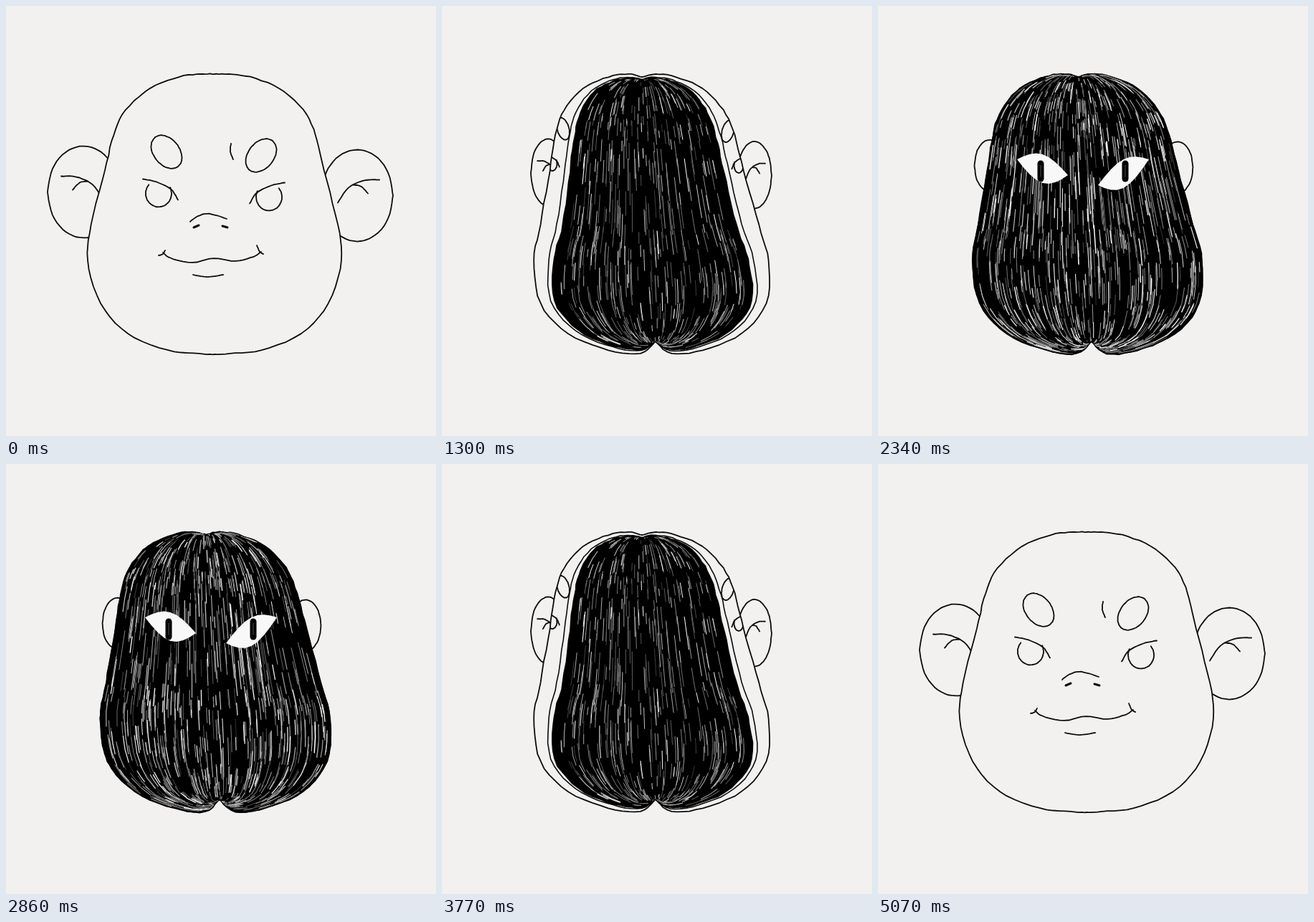
Animation, 600 px wide and 600 px high, one loop 5200 ms. Source, as an HTML page with a canvas:

```html
<!DOCTYPE html>
<html>
<head>
<meta charset="utf-8">
<style>
html, body { margin: 0; height: 100%; overflow: hidden; background: #f2f1f0; }
canvas { display: block; width: 100vw; height: 100vh; }
</style>
</head>
<body>
<canvas id="stage" width="600" height="600"></canvas>
<script>
const ctx = document.getElementById('stage').getContext('2d');
const PAPER = '#f2f1f0', INK = '#0c0c0c';
const STEP = 130, STEPS = 40;
const SIDES = [-1, 1];

const points = s => s.split(' ').map(p => p.split(',').map(Number));
const lerp = (a, b, t) => a + (b - a) * t;
const blend = (a, b, t) => a.map((v, i) => lerp(v, b[i], t));
const mix = (a, b, t) => a.map((p, i) => blend(p, b[i], t));
const clamp = (v, lo = 0, hi = 1) => Math.min(hi, Math.max(lo, v));
const smooth = v => (v = clamp(v), v * v * (3 - 2 * v));

// Half width and height of the head, from the top parting to the bottom one.
const PROFILE = points('0,95 20,95 50,99 90,115 124,145 141,180 153,230 172,305 177,355 159,415 121,457 66,480 22,485 0,486');
const LAST = PROFILE.length - 1;

// Shapes of the profile: waist scale, end scale, lean, cleft, inset.
const FACE = [1, 1, 0, 0, 0];
const SHELL = [.885, 1, 1, 1, 0];
const MANE = [.87, .97, 1, 1, 0];
const SLIT = [0, 0, 1, .7, .03];
const CORE = [.7, .88, 1, .7, .03];

// Places of mirrored parts: axis, distance, height, scales; face, opened, behind hair.
const EAR = [[299, 191, 262, 1, 1], [292, 144, 234, .48, .73], [287, 131, 224, .43, .56]];
const BROW = [[290, 66, 206, 1, 1], [284, 115, 173, .42, .66]];
const EYE = [[290, 77, 264, 1, 1], [284, 130, 221, .36, .55]];

// Parts around their own middle, x pointing outwards.
const earShape = oval(50, 64);
const earFolds = ['31,-22 10,-21 -12,-11 -27,10', '15,-3 5,-13 -6,-15'].map(points);
const browShape = oval(26, 18, -.9);
const eyeShape = oval(18, 19, 0, -.7, 3.6);
const lid = points('22,-20 3,-16 -17,-6 -27,9');

// Parts that slide away from the parting.
const muzzle = [
  '257,301 268,293 284,290 308,297', '213,348 219,346 222,341', '350,334 354,343 359,346',
  '219,344 230,352 260,358 290,352 320,356 345,350 356,343', '261,375 281,378 303,375', '314,192 313,203 317,214'
].map(points);
const nostrils = ['262,309 269,306', '302,307 309,309'].map(points);

function oval(rx, ry, turn = 0, from = 0, to = 2 * Math.PI) {
  return Array.from({ length: 13 }, (_, i) => {
    const a = lerp(from, to, i / 12), x = rx * Math.cos(a), y = ry * Math.sin(a);
    return [x * Math.cos(turn) - y * Math.sin(turn), x * Math.sin(turn) + y * Math.cos(turn)];
  });
}

let rand;
function seeded(seed) {
  return () => {
    seed = seed + 0x6D2B79F5 | 0;
    let n = Math.imul(seed ^ seed >>> 15, 1 | seed);
    n = n + Math.imul(n ^ n >>> 7, 61 | n) ^ n;
    return ((n ^ n >>> 14) >>> 0) / 4294967296;
  };
}

function splineAt(pts, t) {
  const i = Math.min(Math.floor(t), pts.length - 2), f = t - i;
  const b = pts[i], c = pts[i + 1], a = pts[i - 1] || b, d = pts[i + 2] || c;
  return [0, 1].map(n => b[n] + .5 * f * (c[n] - a[n] +
    f * (2 * a[n] - 5 * b[n] + 4 * c[n] - d[n] + f * (3 * (b[n] - c[n]) + d[n] - a[n]))));
}

function curve(pts, shake, parts = 5) {
  const n = (pts.length - 1) * parts;
  return Array.from({ length: n + 1 }, (_, i) => {
    const j = i && i < n ? shake : 0;
    return splineAt(pts, i / parts).map(v => v + (rand() - .5) * 2 * j);
  });
}

function path(line) {
  const p = new Path2D();
  line.forEach(([x, y]) => p.lineTo(x, y));
  return p;
}

function ink(p, width = 1.8, color = INK) {
  ctx.lineWidth = width;
  ctx.strokeStyle = color;
  ctx.stroke(p);
}

function fill(p, color) {
  ctx.fillStyle = color;
  ctx.fill(p);
}

function within(shape, paint) {
  ctx.save();
  ctx.clip(shape);
  paint();
  ctx.restore();
}

const sketch = pts => ink(path(curve(pts, .25)));
const axis = (y, lean) => lerp(291, 279 + .05 * (y - 95), lean);

function half(side, [waist, ends, lean, cleft, inset]) {
  return PROFILE.map(([w, y], i) => {
    const end = smooth((Math.abs(y - 235) - 65) / 140);
    const dip = i === 0 ? 4 : i === LAST ? -18 : 0;
    const h = lerp(y, 290, inset) + dip * cleft;
    return [axis(h, lean) + side * w * lerp(waist, ends, end), h];
  });
}

function outline(shape, shake = .5) {
  const [left, right] = SIDES.map(s => curve(half(s, shape), shake));
  return path([...left, ...right.reverse()]);
}

function place(pts, [mid, d, h, sx, sy], side) {
  return pts.map(([x, y]) => [mid + side * (d + x * sx), h + 2.5 * side * sy + y * sy]);
}

function drawHair(shape, width, grow) {
  const edge = outline(shape, .8);
  fill(edge, '#000');
  ink(edge, 2, '#000');
  const sides = SIDES.map(s => half(s, shape));
  const partings = sides.map(pts => pts.map(([, y]) => {
    const h = clamp(y, pts[0][1], pts[LAST][1]);
    return [axis(h, 1), h];
  }));
  within(edge, () => {
    for (let i = Math.round(lerp(900, 1350, grow) * width); i--;) {
      const side = sides[i % 2], parting = partings[i % 2];
      const start = 1 + Math.floor(rand() * 11) + rand() * .8;
      const end = Math.min(start + .2 + rand() * .6, LAST - .4);
      // Fewer strands where they bunch together.
      const row = Math.round(start);
      if (rand() * 130 > Math.abs(side[row][0] - parting[row][0])) continue;
      const strand = mix(parting, side, rand() * lerp(.92, .98, grow));
      const line = [0, .5, 1].map(f => splineAt(strand, lerp(start, end, f)));
      const shade = Math.round(lerp(70, 255, rand()));
      ink(path(line), .6 + rand() * lerp(.6, .9, grow), `rgb(${shade},${shade},${shade})`);
    }
  });
}

function drawEye(side, open) {
  const outer = [286 + side * lerp(75, 92, open), lerp(228, 214, open)];
  const inner = [286 + side * lerp(39, 21, open), 243 + 7 * side * open];
  const lash = bulge => Array.from({ length: 9 }, (_, i) => {
    const [x, y] = blend(outer, inner, i / 8);
    return [x, y + bulge * Math.sin(Math.PI * i / 8)];
  });
  const shape = path([...lash(lerp(-1.5, -18, open)), ...lash(lerp(1.5, 22, open)).reverse()]);
  fill(shape, '#f8f8f8');
  if (!open) return;
  const x = 286 + side * 59;
  within(shape, () => {
    ink(path([[x, 220], [x, 241]]), 9, '#000');
    ink(path([[x, 222], [x, 238]]), .7, '#777');
  });
}

function draw(k) {
  rand = seeded(k * 977 + 5);
  const open = Math.pow(clamp((k - 4) / 6), 1.2);
  const grow = clamp((k - 10) / 3);
  const head = blend(blend(FACE, SHELL, open), MANE, grow);
  const spot = ([face, opened, hidden = opened]) => blend(blend(face, opened, open), hidden, grow);
  const slide = pts => pts.map(([x, y]) => {
    const d = x - 288;
    return [lerp(x, 288 + Math.sign(d) * 85 + d * .15, open), y];
  });
  const pair = (pts, spots) => SIDES.forEach(s => sketch(place(pts, spot(spots), s)));
  const bare = k < 12;

  ctx.fillStyle = PAPER;
  ctx.fillRect(0, 0, 600, 600);
  ctx.lineCap = ctx.lineJoin = 'round';
  pair(earShape, EAR);
  if (bare) earFolds.forEach(fold => pair(fold, EAR));

  const skin = outline(head);
  fill(skin, PAPER);
  ink(skin);
  if (bare) within(skin, () => {
    pair(browShape, BROW);
    pair(eyeShape, EYE);
    pair(lid, EYE);
    if (open < 1) {
      muzzle.forEach(m => sketch(slide(m)));
      nostrils.forEach(n => ink(path(slide(n)), 3));
    }
  });

  if (!open) {
    const drawn = clamp((k - 2) / 2);
    ctx.setLineDash([69, 31, 47, 17, 3, 12, 127, 9, 23, 19, 33]);
    if (drawn) ink(path([[279, 96], blend([279, 96], [293, 486], drawn)]), 1.3);
    ctx.setLineDash([]);
    return;
  }

  const hair = blend(blend(SLIT, CORE, open), MANE, grow);
  if (grow < 1) {
    const rim = outline(blend(hair, head, .27 * open));
    fill(rim, PAPER);
    ink(rim, 1.6);
  }
  drawHair(hair, open, grow);
  if (k >= 14) SIDES.forEach(s => drawEye(s, smooth((k - 14) / 3)));
}

let shown = -1;
function tick() {
  const n = Math.floor(performance.now() / STEP) % STEPS;
  const k = Math.min(n, STEPS - 1 - n);
  if (k !== shown) draw(shown = k);
  requestAnimationFrame(tick);
}
tick();
</script>
</body>
</html>
```
